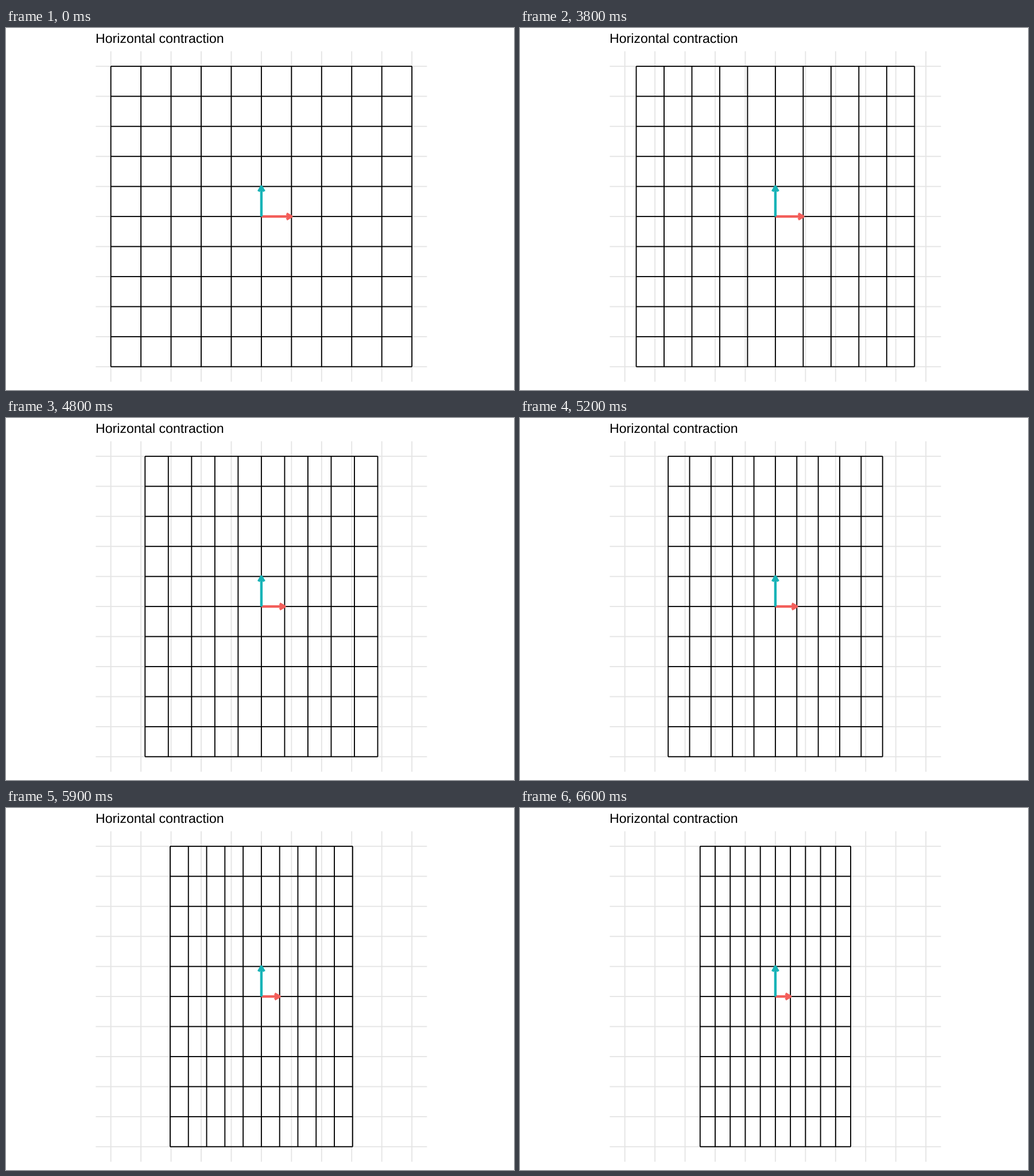
A matplotlib script that plays this animation: 885 px wide and 632 px high, repeating every 10000 ms.

```python
import numpy as np
import matplotlib.pyplot as plt
from matplotlib.animation import FuncAnimation
from matplotlib.collections import LineCollection

plt.rcParams["text.hinting"] = "none"

WIDTH, HEIGHT, DPI = 885, 632, 100
CX, CY = 444.9, 329.1          # origin of the plane, in pixels
UNIT = 52.45                   # pixels per unit
LINE, ARROW = 1.87, 4.4        # stroke widths in pixels
HEAD = 10.0                    # arrow head edge length
RED, TEAL, GRID = "#F35E5A", "#17B3B7", "#E5E5E5"

FRAMES, INTERVAL = 100, 100
START, STEPS = 33, 33          # the squeeze begins after START frames
TICKS = np.arange(-5, 6)


def points(px):
    return px * 72 / DPI


def lattice(scale, reach):
    """Horizontal and vertical lines through all ticks, x scaled by `scale`."""
    sx, sy = UNIT * scale, UNIT
    rows = [[(CX - reach * sx, CY + t * sy), (CX + reach * sx, CY + t * sy)]
            for t in TICKS]
    cols = [[(CX + t * sx, CY - reach * sy), (CX + t * sx, CY + reach * sy)]
            for t in TICKS]
    return rows + cols


def arrow(x, y):
    """Shaft and open head of a vector given in plane units."""
    tip = np.array([CX + x * UNIT, CY - y * UNIT])
    back = np.arctan2(y, -x)
    barbs = [tip + HEAD * np.array([np.cos(a), np.sin(a)])
             for a in (back - np.pi / 6, back + np.pi / 6)]
    return [[(CX, CY), tip], [barbs[0], tip, barbs[1]]]


fig = plt.figure(figsize=(WIDTH / DPI, HEIGHT / DPI), dpi=DPI, facecolor="white")
ax = fig.add_axes([0, 0, 1, 1])
ax.set_xlim(0, WIDTH)
ax.set_ylim(HEIGHT, 0)
ax.axis("off")


def add_lines(segments, color, width, order):
    lines = LineCollection(segments, colors=color, linewidths=points(width),
                           capstyle="butt", joinstyle="round", zorder=order)
    lines.set_snap(False)
    return ax.add_collection(lines, autolim=False)


add_lines(lattice(1, 5.5), GRID, LINE, 1)
mesh = add_lines(lattice(1, 5), "black", LINE, 2)
x_arrow = add_lines(arrow(1, 0), RED, ARROW, 3)
add_lines(arrow(0, 1), TEAL, ARROW, 4)
ax.text(CX - 5.5 * UNIT, 26, "Horizontal contraction", family="Liberation Sans",
        size=points(23.17), color="black", ha="left", va="baseline")


def update(frame):
    progress = np.clip((frame - START) / STEPS, 0, 1)
    scale = 1 - 0.5 * progress
    mesh.set_segments(lattice(scale, 5))
    x_arrow.set_segments(arrow(scale, 0))
    return mesh, x_arrow


anim = FuncAnimation(fig, update, frames=FRAMES, interval=INTERVAL,
                     repeat=True, repeat_delay=0, blit=False)
plt.show()
```
